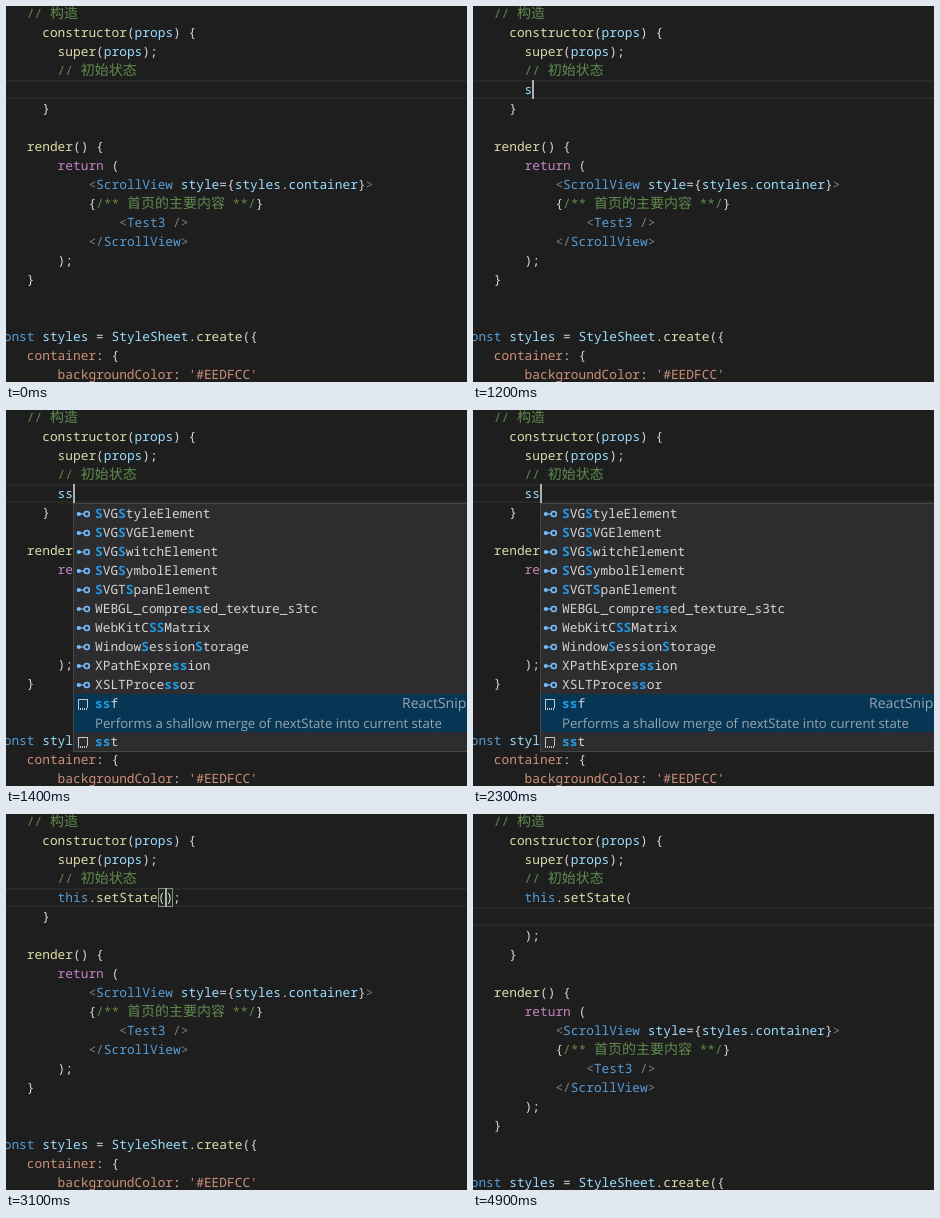
Write an HTML page with a canvas that moves like this. It is 461 px wide and 376 px high and loops after 5200 ms.

```html
<!DOCTYPE html>
<html lang="en">
<head>
<meta charset="utf-8">
<title>Editor snippet</title>
<style>
html, body { margin: 0; width: 100%; height: 100%; overflow: hidden; background: #1e1e1e; }
canvas { display: block; width: 461px; height: 376px; }
</style>
</head>
<body>
<canvas id="stage"></canvas>
<script>
const W = 461, H = 376, LOOP = 5200;
const CHAR = 7.7, LINE = 19, LEFT = -10, TOP = -2;
const MONO = '12.833px "Noto Sans Mono", "DejaVu Sans Mono", monospace';
const CJK = '14px "Noto Sans CJK SC", "Noto Sans CJK JP", "Noto Sans CJK", sans-serif';
const SANS = '"Open Sans", "Noto Sans", sans-serif';

const COLORS = {
  w: '#d4d4d4', g: '#608b4e', y: '#dcdcaa', v: '#9cdcfe',
  b: '#569cd6', p: '#c586c0', t: '#808080', o: '#ce9178'
};

// Each line: column, then tokens split by "~", led by a colour key.
const HEAD = [
  [4, 'g// 构造'],
  [6, 'yconstructor~w(~vprops~w) {'],
  [8, 'ysuper~w(~vprops~w);'],
  [8, 'g// 初始状态']
];
const TAIL = [
  [6, 'w}'],
  [0, ''],
  [4, 'yrender~w() {'],
  [8, 'preturn~w ('],
  [12, 't<~bScrollView~v style~w={~vstyles~w.~vcontainer~w}~t>'],
  [12, 'w{~g/** 首页的主要内容 **/~w}'],
  [16, 't<~bTest3~t />'],
  [12, 't</~bScrollView~t>'],
  [8, 'w);'],
  [4, 'w}'],
  [0, ''],
  [0, ''],
  [0, 'bconst~v styles~w = ~vStyleSheet~w.~ycreate~w({'],
  [4, 'ocontainer~w: {'],
  [8, "obackgroundColor~w: ~o'#EEDFCC'"]
];
const CALL = 'bthis~w.~ysetState~w(';

// Icon key, then label with matched letters in brackets.
const LIST_S = [
  'k[s]et', 'f[s]etImmediate', 'f[s]etInterval', 'f[s]etTimeout',
  'i[S]ourceBuffer', 'i[S]ourceBufferList', 'k[s]tatic', 'v[s]tatus',
  'v[s]tatusbar', 'i[S]tereoPannerNode', 'i[S]torage', 'i[S]torageEvent'
];
const LIST_SS = [
  'i[S]VG[S]tyleElement', 'i[S]VG[S]VGElement', 'i[S]VG[S]witchElement',
  'i[S]VG[S]ymbolElement', 'i[S]VGT[S]panElement',
  'iWEBGL_compre[ss]ed_texture_s3tc', 'iWebKitC[SS]Matrix',
  'iWindow[S]ession[S]torage', 'iXPathExpre[ss]ion', 'iXSLTProce[ss]or',
  'n[ss]f', 'n[ss]t'
];

const canvas = document.getElementById('stage');
const ctx = canvas.getContext('2d');
const dpr = window.devicePixelRatio || 1;
canvas.width = Math.round(W * dpr);
canvas.height = Math.round(H * dpr);

const colX = col => LEFT + col * CHAR;
const rowY = row => TOP + row * LINE;

function rect(x, y, w, h, color) {
  ctx.fillStyle = color;
  ctx.fillRect(x, y, w, h);
}

function text(str, x, y, color, font) {
  ctx.font = font;
  ctx.fillStyle = color;
  ctx.fillText(str, x, y);
}

// Draws mixed Latin and Chinese text and returns the end position.
function mono(str, x, y, color, bold) {
  for (const run of str.match(/[\u2e80-\u9fff]+|[^\u2e80-\u9fff]+/g) || []) {
    const wide = run.charCodeAt(0) >= 0x2e80;
    text(run, x, y, color, wide ? CJK : (bold ? 'bold ' : '') + MONO);
    x += run.length * (wide ? 14 : CHAR);
  }
  return x;
}

function codeLine(row, col, tokens) {
  let x = colX(col);
  for (const tok of tokens.split('~')) {
    x = mono(tok.slice(1), x, rowY(row) + 14, COLORS[tok[0]]);
  }
}

function lineBorder(row) {
  rect(0, rowY(row), W, 2, '#282828');
  rect(0, rowY(row) + LINE - 2, W, 2, '#282828');
}

function cursor(row, col) {
  rect(Math.round(colX(col)), rowY(row), 2, LINE, '#aeafad');
}

function bracketBox(row, col) {
  const x = Math.round(colX(col));
  rect(x, rowY(row), 8, LINE, 'rgba(0,100,0,0.1)');
  ctx.strokeStyle = '#888';
  ctx.lineWidth = 1;
  ctx.strokeRect(x + 0.5, rowY(row) + 0.5, 7, LINE - 1);
}

function path(color, width, points) {
  ctx.strokeStyle = color;
  ctx.lineWidth = width;
  ctx.beginPath();
  points.forEach(([x, y]) => ctx.lineTo(x, y));
  ctx.stroke();
}

function polygon(color, points) {
  ctx.fillStyle = color;
  ctx.beginPath();
  points.forEach(([x, y]) => ctx.lineTo(x, y));
  ctx.fill();
}

// Icons are drawn around their own centre.
const ICONS = {
  k() {
    const c = '#c5c5c5';
    rect(-6, -5, 6, 2, c); rect(2, -5, 4, 1, c);
    rect(-6, -1, 3, 1, c); rect(-1, -1, 7, 1, c);
    rect(-6, 2, 8, 1, c); rect(4, 2, 2, 1, c);
    rect(-6, 5, 5, 1, c); rect(1, 5, 5, 1, c);
  },
  f() {
    const c = '#b180d7';
    path(c, 1.2, [[0, -6], [5.5, -3.2], [5.5, 3.2], [0, 6], [-5.5, 3.2], [-5.5, -3.2], [0, -6]]);
    path(c, 1.2, [[-5.5, -3.2], [0, -0.4], [5.5, -3.2]]);
    path(c, 1.2, [[0, -0.4], [0, 6]]);
  },
  i() {
    const c = '#75beff';
    ctx.fillStyle = c;
    ctx.beginPath();
    ctx.arc(-4.2, 0, 2.1, 0, Math.PI * 2);
    ctx.fill();
    rect(-3, -0.6, 5, 1.2, c);
    ctx.strokeStyle = c;
    ctx.lineWidth = 1.6;
    ctx.beginPath();
    ctx.arc(3.8, 0, 2.5, 0, Math.PI * 2);
    ctx.stroke();
  },
  v() {
    const c = '#75beff';
    polygon(c, [[-6, -1], [1.5, -5], [6, -2.8], [-1.3, 1.2]]);
    polygon(c, [[-6, 0], [-1.8, 2.1], [-1.8, 5.2], [-6, 3]]);
    polygon(c, [[-0.9, 2.1], [6, -1.7], [6, 1.5], [-0.9, 5.2]]);
  },
  n() {
    const c = '#c5c5c5';
    rect(-5, -5, 10, 1, c);
    rect(-5, -5, 1, 9, c);
    rect(4, -5, 1, 9, c);
    for (let x = -5; x < 5; x += 2) rect(x, 4, 1, 2, c);
  }
};

function popup(x, items, selected, detailed) {
  const y = 93, h = (items.length + (detailed ? 1 : 0)) * LINE + 2;
  rect(x, y, W, h, '#454545');
  rect(x + 1, y + 1, W, h - 2, '#2d2d30');
  let top = y + 1;
  items.forEach((item, i) => {
    const on = i === selected, tall = on && detailed;
    if (on) rect(x + 1, top, W, tall ? LINE * 2 : LINE, '#073655');
    ctx.save();
    ctx.translate(x + 10, top + 10);
    ICONS[item[0]]();
    ctx.restore();
    let tx = x + 22;
    item.slice(1).split(/[[\]]/).forEach((part, j) => {
      tx = mono(part, tx, top + 14, j % 2 ? '#219ae4' : '#d4d4d4', j % 2);
    });
    if (tall) {
      text('ReactSnippets', 396, top + 14, '#97a5af', '14px ' + SANS);
      text('Performs a shallow merge of nextState into current state',
        x + 22, top + 34, '#97a5af', '13.17px ' + SANS);
      top += LINE;
    }
    top += LINE;
  });
}

const within = (t, a, b) => t >= a && t < b;

function draw(t) {
  ctx.setTransform(dpr, 0, 0, dpr, 0, 0);
  ctx.textRendering = 'geometricPrecision';
  rect(0, 0, W, H, '#1e1e1e');

  const split = t >= 3500;
  lineBorder(t >= 3600 ? 5 : 4);
  HEAD.forEach(([col, s], i) => codeLine(i, col, s));
  TAIL.forEach(([col, s], i) => codeLine(i + (split ? 7 : 5), col, s));

  if (split) {
    codeLine(4, 8, CALL);
    codeLine(6, 8, 'w);');
    if (within(t, 3600, 4000) || within(t, 4500, 4900)) cursor(5, 12);
  } else if (t >= 3100) {
    bracketBox(4, 21);
    bracketBox(4, 22);
    codeLine(4, 8, CALL + ');');
    cursor(4, 22);
  } else {
    const typed = t < 1200 ? 0 : t < 1400 ? 1 : 2;
    codeLine(4, 8, 'v' + 's'.repeat(typed));
    if (within(t, 1300, 1400)) popup(59, LIST_S, 0, false);
    if (t >= 1400) popup(67, LIST_SS, t < 2500 ? 10 : 11, true);
    if (within(t, 800, 1800) || within(t, 2300, 2700)) cursor(4, 8 + typed);
  }
}

const start = performance.now();
function tick() {
  draw((performance.now() - start) % LOOP);
  requestAnimationFrame(tick);
}
tick();
</script>
</body>
</html>
```
